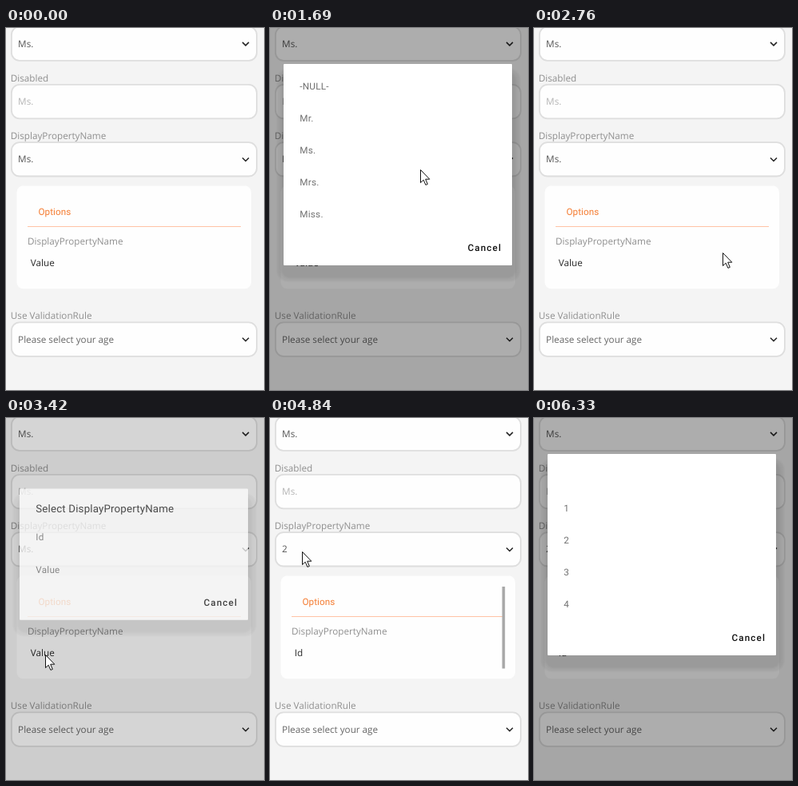
Recreate the animation shown at these times as an HTML page. Size 323 by 453 pixels, loop 6.87 s.

```html
<!DOCTYPE html>
<html lang="en">
<head>
<meta charset="utf-8">
<title>Select fields</title>
<style>
  html, body { margin: 0; width: 100%; height: 100%; overflow: hidden; background: #f4f4f4; }
  svg { display: block; width: 323px; height: 453px; }
  text { font: 11.7px "Open Sans", sans-serif; fill: #555; white-space: pre; text-rendering: geometricPrecision; }
  .label { fill: #8f8f8f; }
  .off { fill: #b4b4b4; }
  .hint { fill: #666; }
  .value { fill: #2a2a2a; }
  .tab, .item, .title, .button { font-family: Roboto, sans-serif; letter-spacing: .25px; }
  .tab { fill: #f47b30; letter-spacing: .08px; }
  .item { fill: #707070; }
  .title { font-size: 13.3px; letter-spacing: .17px; fill: #222; }
  .button { font-weight: 500; letter-spacing: 1.1px; fill: #111; }
  .field { fill: #fefefe; stroke: #dedede; stroke-width: 1.8; }
  .chevron { fill: none; stroke: #222; stroke-width: 1.5; }
  .shadow { fill: #000; opacity: .05; filter: blur(1px); }
</style>
</head>
<body>
<svg id="stage" viewBox="0 0 323 453"></svg>
<script>
const LOOP = 6870;
const STEP = 45;      // fade step in ms
const DIM = .32;      // full scrim opacity
const stage = document.getElementById('stage');

const text = (x, y, s, cls = '', id = '') => `<text x="${x}" y="${y}" class="${cls}" id="${id}">${s}</text>`;
const rect = (x, y, w, h, r, attrs) => `<rect x="${x}" y="${y}" width="${w}" height="${h}" rx="${r}" ${attrs}/>`;

function field(top, label, value, cls = '', id = '') {
  const chevron = cls === 'off' ? '' : `<path class="chevron" d="M296 ${top + 20.3}l4 4 4-4"/>`;
  return text(5.8, top - 3.5, label, 'label')
    + rect(6.9, top + .9, 307, 42.4, 10, 'class="field"')
    + text(15.1, top + 26, value, cls, id) + chevron;
}

function dialog({ id, top, height, title = '', rows }) {
  const first = title ? 153.3 : 76.5;
  return `<g id="${id}" opacity="0">`
    + rect(9, top + 6, 304, height + 14, 14, 'class="shadow"')
    + rect(14, top + 10, 294, height + 6, 11, 'class="shadow"')
    + rect(17, top, 286, height, 1, 'fill="#fff"')
    + text(37.3, 118, title, 'title')
    + rows.map((row, i) => text(37.3, first + i * 40.2, row, 'item')).join('')
    + text(247.6, top + height - 17.7, 'Cancel', 'button') + '</g>';
}

const dialogs = [
  { id: 'titles', open: 990, close: 2390, top: 45, height: 252, rows: ['-NULL-', 'Mr.', 'Ms.', 'Mrs.', 'Miss.'] },
  { id: 'names', open: 3370, close: 4410, top: 88.5, height: 164.3, title: 'Select DisplayPropertyName', rows: ['Id', 'Value'] },
  { id: 'numbers', open: 5250, close: LOOP, top: 45, height: 252, rows: ['', '1', '2', '3', '4'] }
];

stage.innerHTML = rect(0, 0, 323, 453, 0, 'fill="#f4f4f4"')
  + field(-2.4, '', 'Ms.')
  + field(70, 'Disabled', 'Ms.', 'off')
  + field(142.2, 'DisplayPropertyName', 'Ms.', '', 'choice')
  + rect(13.5, 197.5, 293.5, 128.8, 8, 'fill="#fefefe"')
  + text(40.4, 234.2, 'Options', 'tab')
  + rect(27, 248, 267, 1, 0, 'fill="#ffc3a5"')
  + text(27.1, 270.5, 'DisplayPropertyName', 'label')
  + text(30.8, 298, 'Value', 'value', 'property')
  + rect(290.6, 211, 3.6, 102.5, 0, 'id="bar" fill="#a9a9a9" opacity="0"')
  + field(367.5, 'Use ValidationRule', 'Please select your age', 'hint')
  + rect(0, 0, 323, 453, 0, 'id="scrim" opacity="0"')
  + dialogs.map(dialog).join('')
  + '<path id="cursor" d="M.5.5V16.6L4.2 13.2 6.9 19.4 9.3 18.4 6.7 12.2H11.8Z" fill="#fff" stroke="#111"/>';

const el = id => document.getElementById(id);

// The pointer travels from stop to stop; bend bows its path sideways.
const entry = { x: 37, y: 387 };
const stops = [
  { x: 176, y: 162, start: 180, end: 610, bend: .48 },
  { x: 271, y: 278, start: 1640, end: 2020, bend: 0 },
  { x: 49, y: 296, start: 2620, end: 3140, bend: 0 },
  { x: 54, y: 150, start: 3700, end: 4130, bend: .16 },
  { x: 40, y: 167, start: 4600, end: 4840, bend: 0 },
  { x: -14, y: 299, start: 6050, end: 6330, bend: 0 }
];
const exit = stops[stops.length - 1];

// Share done at time t, in even steps that finish exactly at end.
function progress(t, start, end) {
  if (t < start) return 0;
  const steps = Math.round((end - start) / 48) + 1;
  const step = Math.floor((t - start) / (end - start) * (steps - 1) + .01);
  return Math.min(1, (step + 1) / steps);
}

function cursorAt(t) {
  const i = Math.max(0, stops.filter(s => t >= s.start).length - 1);
  const a = stops[i - 1] || entry, b = stops[i];
  const p = progress(t, b.start, b.end);
  const e = p * p * (3 - 2 * p);
  const bow = 2 * e * (1 - e) * b.bend;
  const dx = b.x - a.x, dy = b.y - a.y;
  return [a.x + dx * e - dy * bow, a.y + dy * e + dx * bow];
}

const fade = (t, start, steps) => Math.max(0, Math.min(1, (Math.floor((t - start) / STEP) + 1) / steps));

function draw(t) {
  let dim = 0;
  for (const { id, open, close } of dialogs) {
    const shown = fade(t, open, 4), left = 1 - fade(t, close, 5);
    el(id).setAttribute('opacity', shown * (2 - shown) * left * left);
    dim += DIM * shown * left;
  }
  el('scrim').setAttribute('opacity', dim);

  const chosen = t >= 4460;
  el('choice').textContent = chosen ? '2' : 'Ms.';
  el('property').textContent = chosen ? 'Id' : 'Value';
  el('bar').setAttribute('opacity', chosen ? 1 - progress(t, exit.start, exit.end) : 0);

  const [x, y] = cursorAt(t).map(Math.round);
  el('cursor').setAttribute('transform', `translate(${x} ${y})`);
  el('cursor').setAttribute('visibility', t >= stops[0].start && t < exit.end ? 'visible' : 'hidden');
}

const origin = performance.now();
function tick() {
  draw((performance.now() - origin) % LOOP);
  requestAnimationFrame(tick);
}
tick();
</script>
</body>
</html>
```
